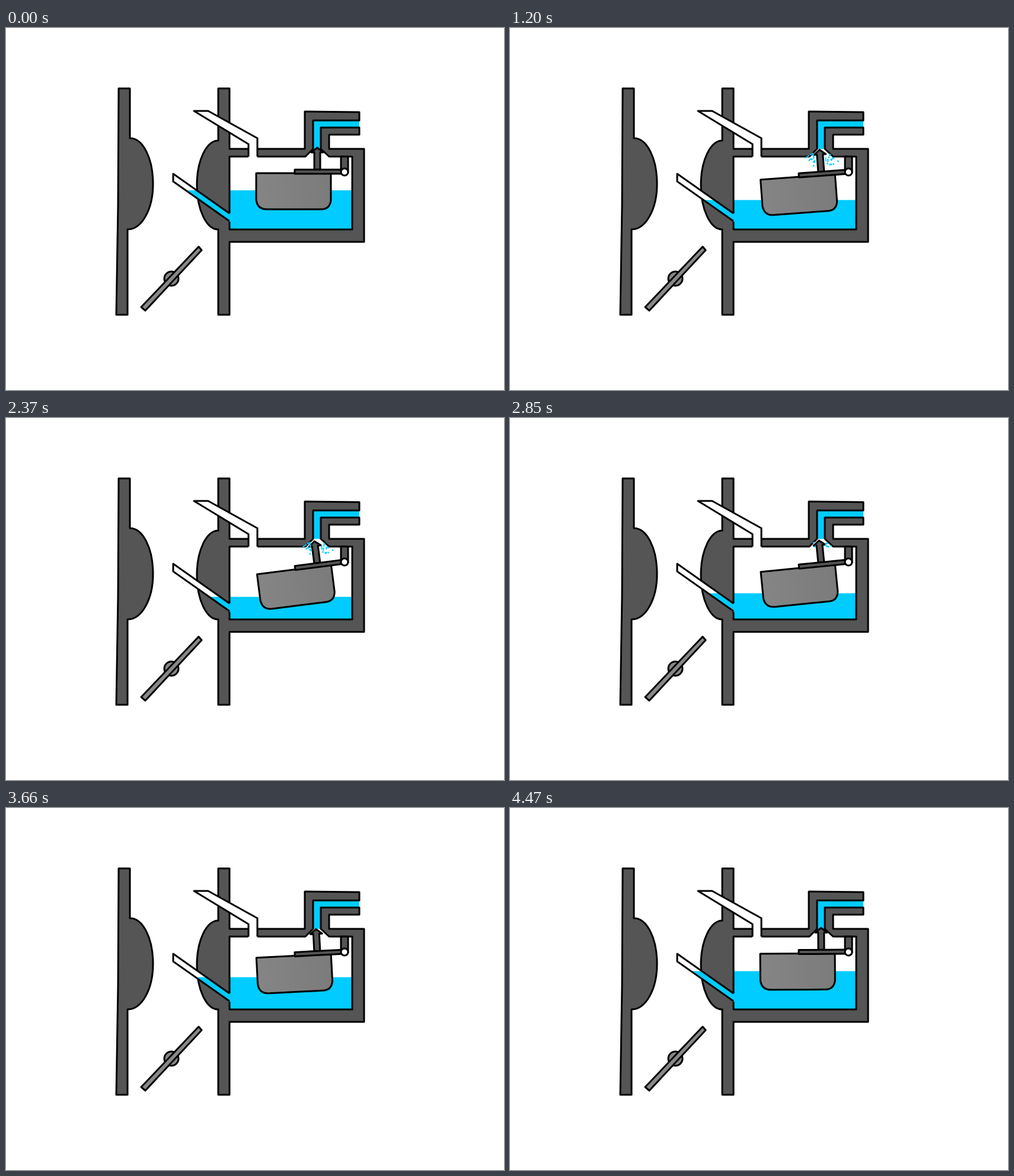
Animation of 840 by 611 pixels, one loop 4500 ms. Source, as an HTML page:

```html
<!DOCTYPE html>
<html lang="en">
<head>
<meta charset="utf-8">
<title>Float chamber</title>
<style>
  html, body { margin: 0; width: 100%; height: 100%; overflow: hidden; background: #fff; }
  svg { display: block; }
  .line { stroke: #000; stroke-width: 3; stroke-linejoin: round; }
  .wall { fill: #555; }
  .steel { fill: #888; }
  .fuel { fill: #0cf; }
  .white { fill: #fff; }
  .none { fill: none; }
</style>
</head>
<body>
<svg width="840" height="611" viewBox="0 0 840 611">
  <defs>
    <linearGradient id="shade" x1="0" y1="0" x2="1" y2="0">
      <stop offset="0" stop-color="#858585"/>
      <stop offset="1" stop-color="#7b7b7b"/>
    </linearGradient>
    <clipPath id="bore"><path d="M282 246L377 313H379V327H377L282 259Z"/></clipPath>
  </defs>

  <!-- fuel in the bowl and inlet -->
  <rect id="bowl" class="fuel" x="377" width="207"/>
  <path class="fuel" d="M518 156H596V168H531V204H518Z"/>

  <!-- venturi and chamber walls -->
  <path class="wall line" d="M190 102H209V186C231 186 248 220 248 263C248 306 229 340 205 340V484H186L189 300Z"/>
  <path class="wall line" d="M358 102H377V204H504V141L596 142V156H518V204L505 217H377V340H584V217H545L531 204V168H596V180H545V204H604V361H377V484H358V340A36 75 0 0 1 358 190Z"/>

  <!-- vent tube -->
  <path class="white" d="M317 140H341L424 186V219H409V196Z"/>
  <path class="none line" d="M409 217V196L317 140H341L424 186V217"/>

  <!-- jet tube -->
  <g clip-path="url(#bore)">
    <rect class="white" x="280" y="240" width="100" height="90"/>
    <rect id="jet" class="fuel" x="280" width="100"/>
  </g>
  <path class="none line" d="M377 313L282 246V259L377 326"/>

  <!-- throttle -->
  <circle class="steel line" cx="279" cy="423" r="12"/>
  <path class="steel line" d="M325 369L330 375L235 477L228 471Z"/>

  <!-- float, lever and needle -->
  <path class="wall line" d="M565 217H577V244H565Z"/>
  <g id="arm">
    <path class="line" fill="url(#shade)" d="M422 245H548V291Q546 306 532 306H440Q424 306 422 290Z"/>
    <path class="wall line" d="M520 239V210H515L525 202L535 210H530V239Z"/>
    <path class="wall line" d="M487 239H568V246H487Z"/>
  </g>
  <circle class="white line" cx="571" cy="243" r="6"/>
  <g id="spray" class="fuel"></g>
</svg>
<script>
const LOOP = 4500, STEP = 30, LOWEST = 2200;
const SPRAY_FROM = 960, SPRAY_TO = 3360, BURST = 300;
const byId = id => document.getElementById(id);
const [bowl, jet, arm, spray] = ['bowl', 'jet', 'arm', 'spray'].map(byId);

let seed = 11;
const rand = () => (seed = seed * 16807 % 2147483647) / 2147483647;

const drops = [];
for (let i = 0; i < 32; i++) {
  const el = document.createElementNS('http://www.w3.org/2000/svg', 'ellipse');
  el.setAttribute('rx', 1.1);
  el.setAttribute('ry', 1.8);
  spray.append(el);
  const side = i % 2 ? 1 : -1;
  drops.push({
    el, side,
    angle: 0.1 + 0.95 * rand(),
    delay: 0.6 * rand() + (side < 0 ? 0.1 : 0),
    reach: 26 + 6 * rand()
  });
}

function fall(t) {
  return t < LOWEST ? 30 * t / LOWEST : 30 - 29 * (t - LOWEST) / (LOOP - LOWEST);
}

function setLevel(rect, y, bottom) {
  rect.setAttribute('y', y);
  rect.setAttribute('height', bottom - y);
}

function drawSpray(t) {
  const on = t >= SPRAY_FROM && t < SPRAY_TO;
  const phase = (t - SPRAY_FROM) % BURST / BURST;
  for (const d of drops) {
    const age = phase - d.delay;
    const show = on && age > 0;
    d.el.style.display = show ? '' : 'none';
    if (!show) continue;
    const r = 4 + age * d.reach;
    const x = (d.side < 0 ? 516 : 531) + d.side * r * Math.sin(d.angle);
    const y = 208 + r * Math.cos(d.angle);
    const tilt = -d.side * d.angle * 57.3;
    d.el.setAttribute('transform', `translate(${x} ${y}) rotate(${tilt})`);
  }
}

function draw(now) {
  const t = Math.floor(now % LOOP / STEP) * STEP;
  const drop = fall(t);
  setLevel(bowl, 274 + drop, 340);
  setLevel(jet, 274 + drop, 340);
  arm.setAttribute('transform', `rotate(${-0.26 * drop} 571 243)`);
  drawSpray(t);
}

const start = performance.now();
function tick() {
  draw(performance.now() - start);
  requestAnimationFrame(tick);
}
tick();
</script>
</body>
</html>
```
